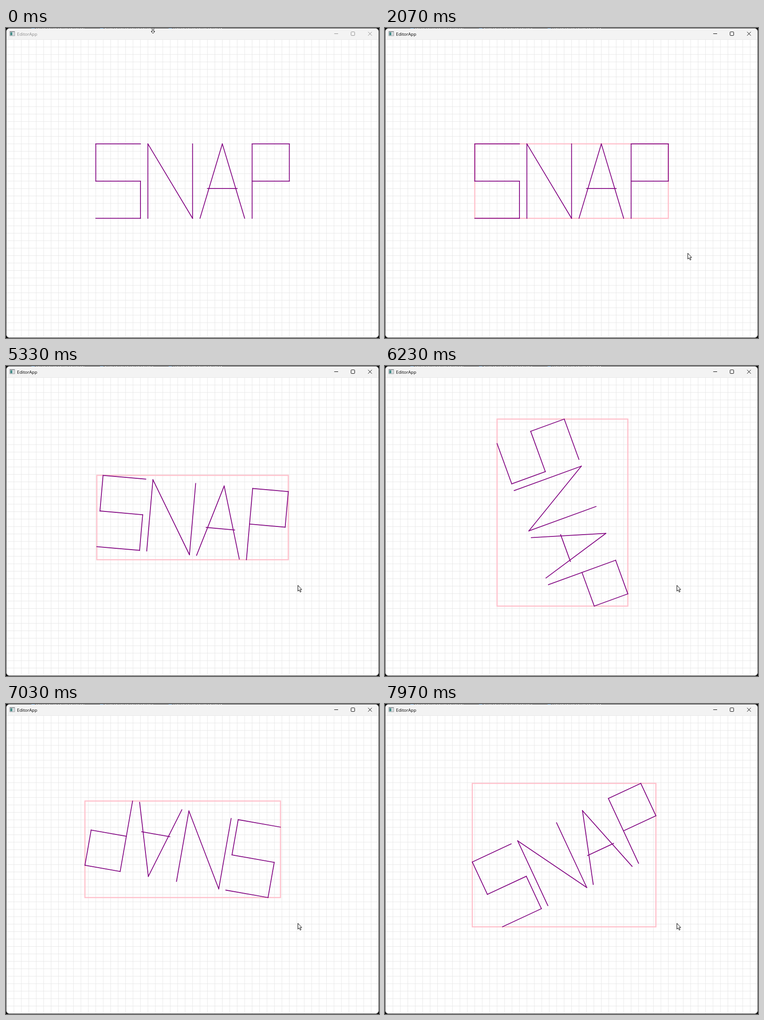
An HTML page with a canvas for the animation above (8 s loop, 821 by 682 pixels).

```html
<!DOCTYPE html>
<html lang="en">
<head>
<meta charset="utf-8">
<title>EditorApp</title>
<style>
  html, body { margin: 0; width: 100%; height: 100%; overflow: hidden; background: #000; }
  canvas { display: block; }
</style>
</head>
<body>
<canvas id="stage" width="821" height="682"></canvas>
<script>
const ctx = document.getElementById('stage').getContext('2d');
const W = 821, H = 682, LOOP = 8000, TICK = 100 / 3;
const CELL = 16.385, LEFT = 1, TOP = 25.5;
const PURPLE = '#800080', PINK = '#ffc0cb', GRID = '#e6e6e6';
const THIN = 0.9, STROKE = 1.75, OUTLINE = 2.46;
const PRESS = 730, RELEASE = 2070, FIRST_TURN = 5330, SPIN = 5829, REPEAT = 32.7;
const TURN = Math.PI / 36;

const clamp = (v, lo, hi) => Math.min(hi, Math.max(lo, v));
const mix = (a, b, u) => a + (b - a) * u;
const range = n => Array.from({ length: n }, (_, i) => i);

// Letters are polylines in grid cells, each built from its width.
const TALL = 10, MID = TALL / 2;
const LETTERS = [
  [6, w => [[[w, 0], [0, 0], [0, MID], [w, MID], [w, TALL], [0, TALL]]]],
  [6, w => [[[0, TALL], [0, 0], [w, TALL], [w, 0]]]],
  [6, w => [[[0, TALL], [w / 2, 0], [w, TALL]], [[1, MID + 1], [w - 1, MID + 1]]]],
  [5, w => [[[0, TALL], [0, 0], [w, 0], [w, MID], [0, MID]]]]
];
const STROKES = [];
let wide = 0;
for (const [w, shape] of LETTERS) {
  for (const stroke of shape(w)) STROKES.push(stroke.map(([x, y]) => [x + wide, y]));
  wide += w + 1;
}
wide -= 1;
const HOME = { x: LEFT + 25 * CELL, y: TOP + 19 * CELL };

function rotate(x, y, angle) {
  const c = Math.cos(angle), s = Math.sin(angle);
  return [x * c - y * s, x * s + y * c];
}

function place(pose) {
  const k = CELL * pose.scale;
  return STROKES.map(stroke => stroke.map(([px, py]) => {
    const [x, y] = rotate((px - wide / 2) * k, (py - MID) * k, pose.angle);
    return [pose.x + x, pose.y + y];
  }));
}

function bounds(strokes) {
  const pts = strokes.flat(), xs = pts.map(p => p[0]), ys = pts.map(p => p[1]);
  const x = Math.min(...xs), y = Math.min(...ys);
  return { x, y, w: Math.max(...xs) - x, h: Math.max(...ys) - y };
}

// Four key presses enlarge the word by a tenth, four more shrink it.
function scaleAt(t) {
  const presses = (first, gap) => clamp(Math.floor((t - first) / gap) + 1, 0, 4);
  return 1.1 ** presses(3230, 200) * 0.9 ** presses(4130, 233);
}

// Each turn pivots on the middle of the current bounds, so the word drifts.
function turned(pose) {
  const b = bounds(place(pose)), cx = b.x + b.w / 2, cy = b.y + b.h / 2;
  const [dx, dy] = rotate(pose.x - cx, pose.y - cy, TURN);
  return { ...pose, x: cx + dx, y: cy + dy, angle: pose.angle + TURN };
}

function poseAt(t) {
  const held = t < SPIN ? 0 : 1 + Math.floor((t - SPIN) / REPEAT);
  const turns = t < FIRST_TURN ? 0 : 1 + held;
  return range(turns).reduce(turned, { ...HOME, angle: 0, scale: scaleAt(t) });
}

const EDGE = [323, 4], ANCHOR = [143.5, 203], CORNER = [666, 495], REST = [642, 481.5];

function pointerAt(t) {
  const glide = (from, to, t0, t1) => {
    const u = clamp((t - t0) / (t1 - t0), 0, 1), e = u * u * (3 - 2 * u);
    return from.map((v, i) => mix(v, to[i], e));
  };
  const pos = t < 700 ? glide(EDGE, ANCHOR, 10, 567)
    : t < 2040 ? glide(ANCHOR, CORNER, 700, 1570)
    : glide(CORNER, REST, 2040, 2467);
  return pos.map(Math.round);
}

function polygon(points, fill, stroke) {
  ctx.beginPath();
  points.forEach(([x, y]) => ctx.lineTo(x, y));
  ctx.closePath();
  ctx.fillStyle = fill;
  ctx.fill();
  ctx.strokeStyle = stroke;
  ctx.lineWidth = 1;
  ctx.stroke();
}

function line(x0, y0, x1, y1, color, width) {
  ctx.beginPath();
  ctx.moveTo(x0, y0);
  ctx.lineTo(x1, y1);
  ctx.strokeStyle = color;
  ctx.lineWidth = width;
  ctx.stroke();
}

function outline(x, y, w, h) {
  ctx.strokeStyle = PINK;
  ctx.lineWidth = OUTLINE;
  ctx.strokeRect(x, y, w, h);
}

function rect(x, y, w, h, color) {
  ctx.fillStyle = color;
  ctx.fillRect(x, y, w, h);
}

function drawTitleBar(active) {
  const ink = active ? '#000' : '#8c8c8c';
  rect(0, 0, W, 25, '#f3f3f3');
  rect(8, 7, 11.5, 10.5, '#8f9498');
  rect(9, 9, 9.5, 7.5, '#f4f6f7');
  rect(9.5, 9.5, 4.5, 6.5, '#458c88');
  rect(15, 9.5, 3, 6.5, '#d5d9dc');
  ctx.fillStyle = ink;
  ctx.font = '9.6px "Open Sans", "Noto Sans", sans-serif';
  ctx.fillText('EditorApp', 24.3, 16.6);
  line(722.5, 12.5, 731, 12.5, ink, 1);
  ctx.beginPath();
  ctx.roundRect(759.5, 8.5, 8, 8, 1);
  ctx.stroke();
  line(797, 8.5, 805.3, 16.8, ink, 1);
  line(805.3, 8.5, 797, 16.8, ink, 1);
}

function drawGrid() {
  rect(0, 25, W, H, '#fff');
  for (let x = LEFT; x < W; x += CELL) line(x, TOP, x, H, GRID, THIN);
  for (let y = TOP; y < H; y += CELL) line(0, y, W, y, GRID, THIN);
}

function drawWindow(active) {
  const frame = new Path2D();
  frame.roundRect(0.5, 0.5, W - 1, H - 1, 7);
  rect(0, 0, W, H, '#000');
  ctx.save();
  ctx.clip(frame);
  drawGrid();
  drawTitleBar(active);
  ctx.restore();
  ctx.strokeStyle = '#3c3c3c';
  ctx.lineWidth = 1;
  ctx.stroke(frame);
  // Slivers of whatever lies behind the top edge.
  for (let x = 56; x < 400; x += 151) {
    rect(x, 0, 7, 1, '#4f86b5');
    for (let i = x + 11; i < x + 116; i += 4) rect(i, 0, 1 + (i * 7 % 3) / 2, 1, '#b8b8b8');
  }
}

function drawWord(strokes) {
  ctx.lineCap = 'square';
  for (const stroke of strokes) {
    for (let i = 1; i < stroke.length; i++) line(...stroke[i - 1], ...stroke[i], PURPLE, STROKE);
  }
  ctx.lineCap = 'butt';
}

function drawPointer([x, y]) {
  const half = [[1.5, -5], [1.5, 3], [4, 3], [0, 7.5]];
  const resize = [...half, ...half.map(([px, py]) => [-px, py]).reverse()];
  const arrow = [[0, 0], [0, 12.8], [2.9, 10.2], [5, 15], [7, 14.1], [5, 9.4], [8.6, 9.4]];
  const shape = y < 10 ? resize : arrow;
  polygon(shape.map(([px, py]) => [x + px + 0.5, y + py + 0.5]), '#fff', '#000');
}

function draw(time) {
  const t = Math.round(Math.floor((time + 3.5) / TICK) * TICK / 10) * 10;
  const word = place(poseAt(t)), pointer = pointerAt(t);
  drawWindow(t >= PRESS);
  if (t >= RELEASE) {
    const b = bounds(word);
    outline(b.x, b.y, b.w, b.h);
  }
  drawWord(word);
  if (t >= PRESS && t < RELEASE) {
    const [x, y] = ANCHOR;
    outline(x, y, pointer[0] - x, pointer[1] - y);
  }
  drawPointer(pointer);
}

const start = performance.now();
function tick() {
  draw((performance.now() - start) % LOOP);
  requestAnimationFrame(tick);
}
tick();
</script>
</body>
</html>
```
